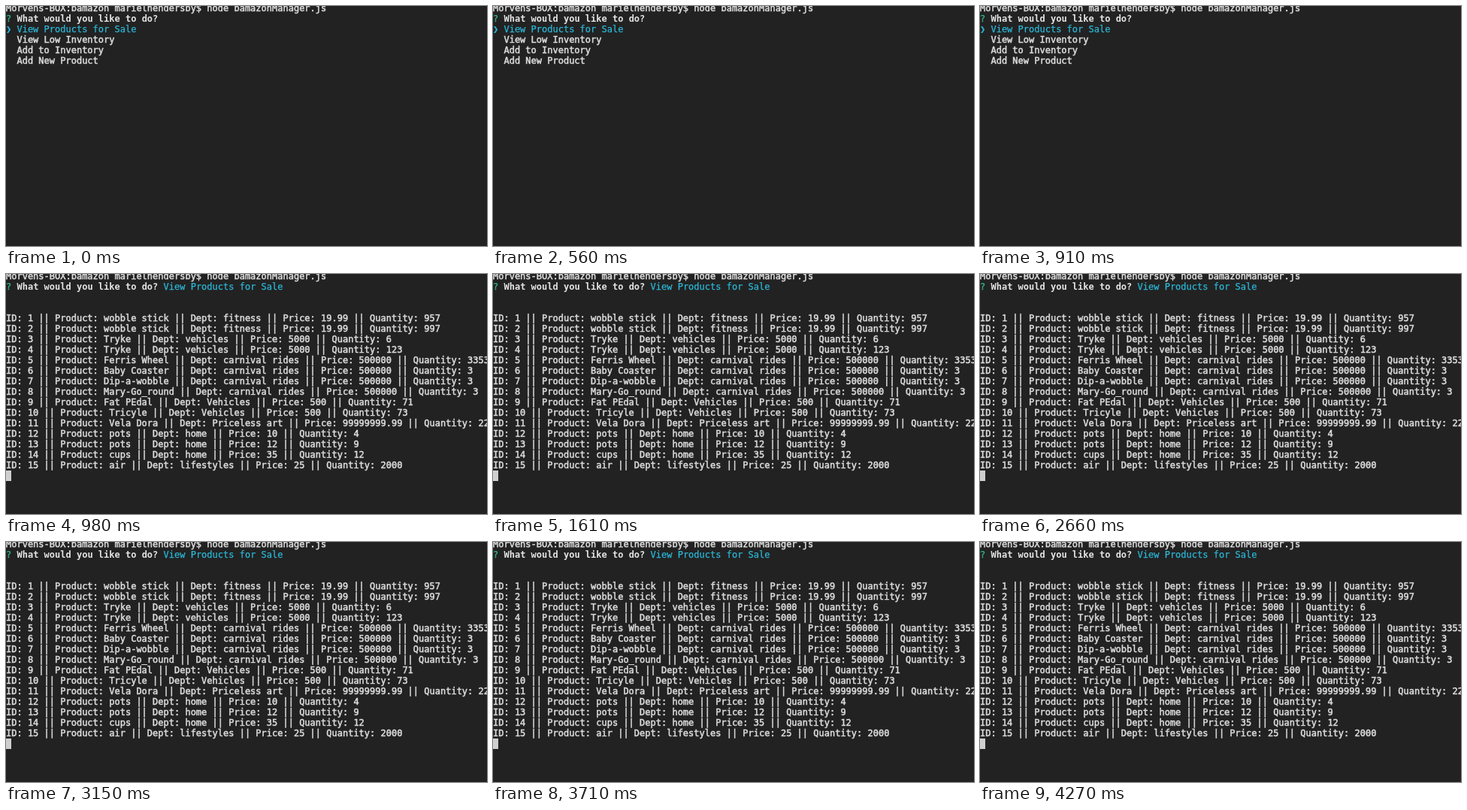
These frames come from a looping animation (640 px wide and 320 px high, 4.69 s). An HTML page:

```html
<!DOCTYPE html>
<html lang="en">
<head>
<meta charset="utf-8">
<title>Store manager</title>
<style>
  html, body { margin: 0; width: 100%; height: 100%; overflow: hidden; background: #222; }
  #stage { position: relative; width: 100%; height: 100%; overflow: hidden; contain: strict; }
  pre {
    position: absolute; left: 0; top: -4px; margin: 0;
    font: 12px/14px "DejaVu Sans Mono", monospace;
    color: #dcdcdc; -webkit-text-stroke: .5px;
  }
  pre div { height: 14px; }
  b { color: #e4e4e4; -webkit-text-stroke: 0; }
  i { font-style: normal; color: #2bb8d8; -webkit-text-stroke: .25px; }
  .ask { color: #2fba8c; }
  .mark { display: inline-block; width: 1ch; height: 14px; vertical-align: top; }
  .cursor { width: 7px; background: #cfcfcf; }
</style>
</head>
<body>
<div id="stage"><pre id="term"></pre></div>
<script>
const LOOP = 4690, CHOOSE = 980;

const choices = ["View Products for Sale", "View Low Inventory", "Add to Inventory", "Add New Product"];

// product, department, price, quantity
const stock = [
  ["wobble stick", "fitness", "19.99", 957],
  ["wobble stick", "fitness", "19.99", 997],
  ["Tryke", "vehicles", 5000, 6],
  ["Tryke", "vehicles", 5000, 123],
  ["Ferris Wheel", "carnival rides", 500000, 3353],
  ["Baby Coaster", "carnival rides", 500000, 3],
  ["Dip-a-wobble", "carnival rides", 500000, 3],
  ["Mary-Go_round", "carnival rides", 500000, 3],
  ["Fat PEdal", "Vehicles", 500, 71],
  ["Tricyle", "Vehicles", 500, 73],
  ["Vela Dora", "Priceless art", "99999999.99", 22],
  ["pots", "home", 10, 4],
  ["pots", "home", 12, 9],
  ["cups", "home", 35, 12],
  ["air", "lifestyles", 25, 2000]
];

const command = "Morvens-BOX:bamazon marielhendersby$ node bamazonManager.js";
const question = '<i class="ask">?</i> <b>What would you like to do?</b>';

const menu = choices.map((c, n) =>
  n ? "  " + c : `<i><span class="mark">❯</span> ${c}</i>`);

const table = stock.map(([name, dept, price, count], n) =>
  `ID: ${n + 1} || Product: ${name} || Dept: ${dept} || Price: ${price} || Quantity: ${count}`);

const page = lines => lines.map(l => `<div>${l}</div>`).join("");
const screens = [
  page([command, question, ...menu]),
  page([command, `${question} <i>${choices[0]}</i>`, "", "", ...table,
    '<span class="mark cursor"></span>'])
];

const term = document.getElementById("term");
let shown = -1;

function draw(now) {
  const next = now % LOOP < CHOOSE ? 0 : 1;
  if (next !== shown) term.innerHTML = screens[shown = next];
}

const start = performance.now();
function tick() {
  draw(performance.now() - start);
  requestAnimationFrame(tick);
}
tick();
</script>
</body>
</html>
```
